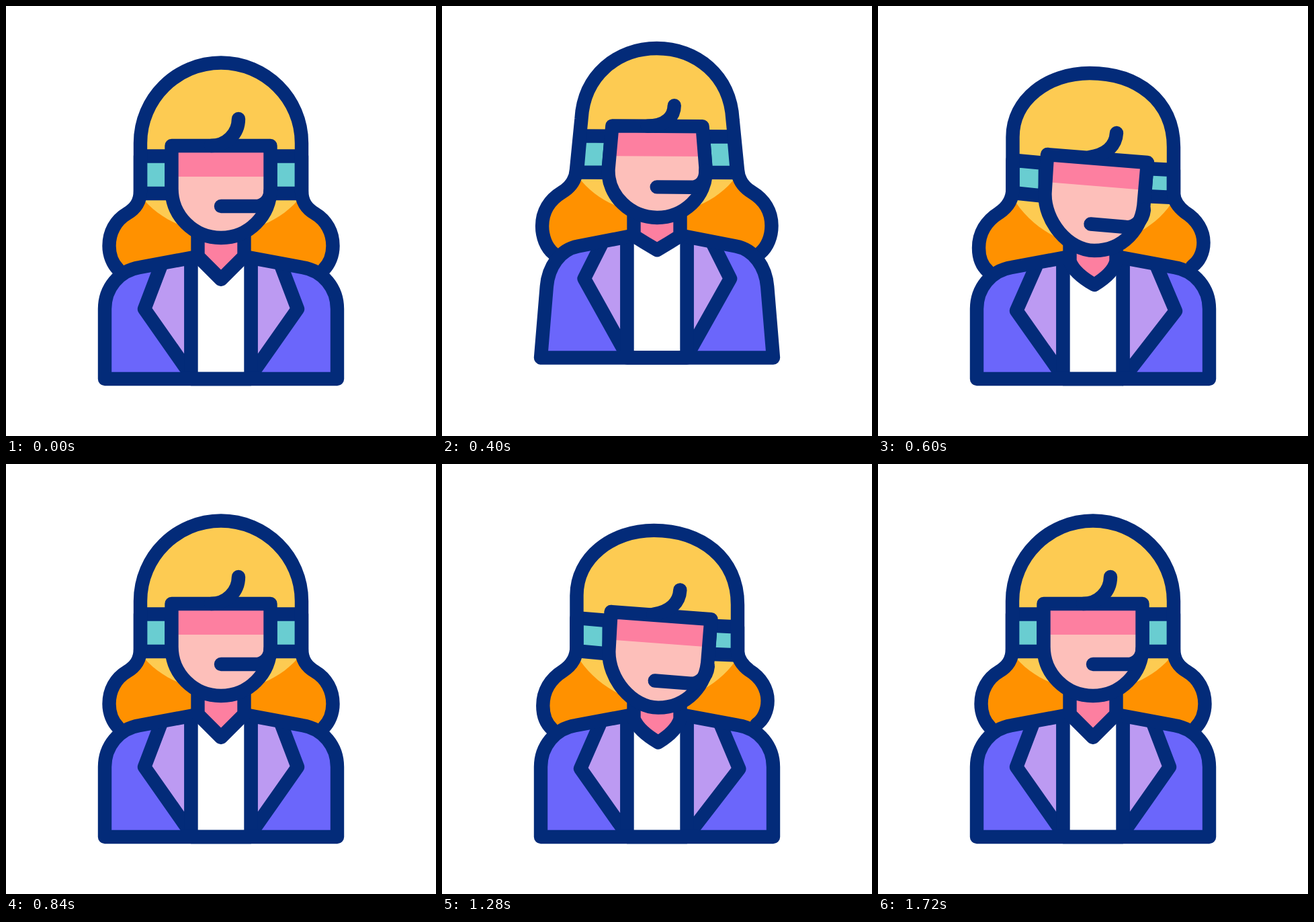
Recreate the animation shown at these times as an HTML page. Size 640 px wide and 640 px high, loop 2000 ms.

```html
<!DOCTYPE html>
<html lang="en">
<head>
<meta charset="utf-8">
<title>Support agent</title>
<style>
  html, body { margin: 0; width: 100%; height: 100%; overflow: hidden; background: #fff; }
  svg { display: block; width: 100%; height: 100%; stroke-width: 20.4; stroke-linecap: round; stroke-linejoin: round; }
</style>
</head>
<body>
<svg id="stage" viewBox="0 0 640 640"></svg>
<script>
const INK = '#032b79', YELLOW = '#fdcb52', ORANGE = '#ff9100', SKIN = '#fdbfba',
  PINK = '#fd7fa0', TEAL = '#69cdd1', VIOLET = '#6b66fb', LILAC = '#bc9af2';

// Every shape is drawn in three poses: rest, jump, nod.
const REST = 0, JUMP = 1, NOD = 2;

const keys = [
  [0, REST], [120, REST], [360, JUMP], [600, NOD], [840, REST],
  [1080, REST], [1320, NOD], [1720, REST], [2000, REST]
];
const LOOP = 2000, TICK = 40;

const flip = d => d.replace(/([\d.]+) ([\d.]+)/g, (m, x, y) => `${640 - x} ${y}`);
const pair = (rest, jump, nodLeft, nodRight) =>
  [[rest, jump, nodLeft], [flip(rest), flip(jump), nodRight || flip(nodLeft)]];

const hair = [
  'M167 392C159 384 153.5 371 153.5 357C153.5 337 163 319 180 309C192 302 200 292 200 275L200 204C200 138 254 84.5 320 84.5C386 84.5 440 138 440 204L440 275C440 292 448 302 460 309C477 319 486.5 337 486.5 357C486.5 371 481 384 473 392',
  'M166 366C155 357 149 341 149 325C149 303 160 286 178 275C190 268 199 258 200 241L208 166C212 100 262 60 320 60C378 60 428 100 432 166L440 241C441 258 450 268 462 275C480 286 491 303 491 325C491 341 485 357 474 366',
  'M164 395C156 388 150 376 150 360C150 338 161 320 180 308C192 300 200.5 288 200.5 272L200.5 195C200.5 140 252 100 315 100C385 100 440 140 440 210L440 280C441 292 448 300 457 307C475 318 484.5 335 484.5 352C484.5 367 478 380 468 387'
];
const crown = [
  'M200 282L200 204C200 138 254 84.5 320 84.5C386 84.5 440 138 440 204L440 282C410 322 360 338 320 338C280 338 230 322 200 282Z',
  'M200 248L208 166C212 100 262 60 320 60C378 60 428 100 432 166L440 248C410 290 360 306 320 306C280 306 230 290 200 248Z',
  'M200 284L200.5 195C200.5 140 252 100 315 100C385 100 440 140 440 210L440 288C420 325 365 357 318 357C275 357 225 328 200 284Z'
];
const phones = pair(
  'M200 223.5L246.5 223.5L246.5 279L200 279Z',
  'M206 190.5L252 190.5L247.5 245L201 245Z',
  'M200.5 229.5L249 234L248.5 283L200.5 278Z',
  'M440 244L400 242L397 283L440 285Z'
);
const bodyRest = 'M285 373L199 389C168 394 147 420 147 451L147 555L493 555L493 451C493 420 472 394 441 389L355 373';
const body = [
  bodyRest,
  'M285 339L203 355C176 360 159 386 156.5 415L147 521L493 521L483.5 415C481 386 464 360 437 355L355 339',
  bodyRest
];
const lapels = pair(
  'M230 388L206 451L275.5 550L275.5 378',
  'M237 353L212 402L275.5 518L275.5 344',
  'M235 388L206 453.5L275.5 552L275.5 378',
  'M415 388L443 454L364.5 555L364.5 378'
);
const shirtRest = 'M275.5 376L275.5 555L364.5 555L364.5 376';
const shirt = [shirtRest, 'M275.5 342L275.5 521L364.5 521L364.5 342', shirtRest];
const neck = [
  'M285.5 340L285.5 372.5Q303 390 320 407Q337 390 354.5 372.5L354.5 340',
  'M285.5 306L285.5 339Q303 349 320 359Q337 349 354.5 339L354.5 306',
  'M285.5 355L285.5 380Q292 398 322 415Q350 398 354.5 380L354.5 355'
];
const face = [
  'M246.5 208L246.5 272C246.5 312 279 345 320 345C361 345 393.5 312 393.5 272L393.5 208Z',
  'M253.5 175L247.5 240C246 280 281 311 320 311C359 311 394 280 392.5 240L386.5 175Z',
  'M252 221L248.5 278C247 320 283 364 322 364C364 364 394 332 396 290L401 233Z'
];
const shade = [
  'M246.5 208L393.5 208L393.5 254L246.5 254Z',
  'M253.5 175L386.5 175L391 220L249 220Z',
  'M252 221L401 233L398 274L250 262Z'
];
const mic = [
  'M320 298L371 298C384 298 394 288 394 273',
  'M320 265L371 265C384 265 393 255 392 240',
  'M316.5 324.5L369 329C382 330 394 320 396 303'
];
const fringe = [
  'M346 168C346 190 328 208 305 208',
  'M345 145C345 160 334 175 305 175',
  'M355 189C354 207 341 221 315 225'
];

const stage = document.getElementById('stage');
const parts = [];
function add(poses, fill, stroke) {
  const el = document.createElementNS('http://www.w3.org/2000/svg', 'path');
  el.setAttribute('fill', fill);
  el.setAttribute('stroke', stroke);
  stage.append(el);
  parts.push({ el, poses });
}

add(hair, ORANGE, 'none');
add(crown, YELLOW, 'none');
phones.forEach(p => add(p, TEAL, INK));
add(hair, 'none', INK);
add(body, VIOLET, 'none');
lapels.forEach(p => add(p, LILAC, INK));
add(shirt, '#fff', INK);
add(body, 'none', INK);
add(neck, PINK, INK);
add(face, SKIN, 'none');
add(shade, PINK, 'none');
add(face, 'none', INK);
add(mic, 'none', INK);
add(fringe, 'none', INK);

const NUM = /[\d.]+/g;
function mix(a, b, k) {
  const to = b.match(NUM);
  let i = 0;
  return a.replace(NUM, v => (+v + (to[i++] - v) * k).toFixed(2));
}
const ease = k => k * k * (3 - 2 * k);

function draw(t) {
  const i = keys.findIndex(([end]) => end > t);
  const [t0, from] = keys[i - 1], [t1, to] = keys[i];
  const k = ease((t - t0) / (t1 - t0));
  for (const { el, poses } of parts) el.setAttribute('d', mix(poses[from], poses[to], k));
}

const start = performance.now();
function frame(now) {
  const t = Math.max(0, now - start) % LOOP;
  draw(Math.floor(t / TICK) * TICK);
  requestAnimationFrame(frame);
}
draw(0);
requestAnimationFrame(frame);
</script>
</body>
</html>
```
